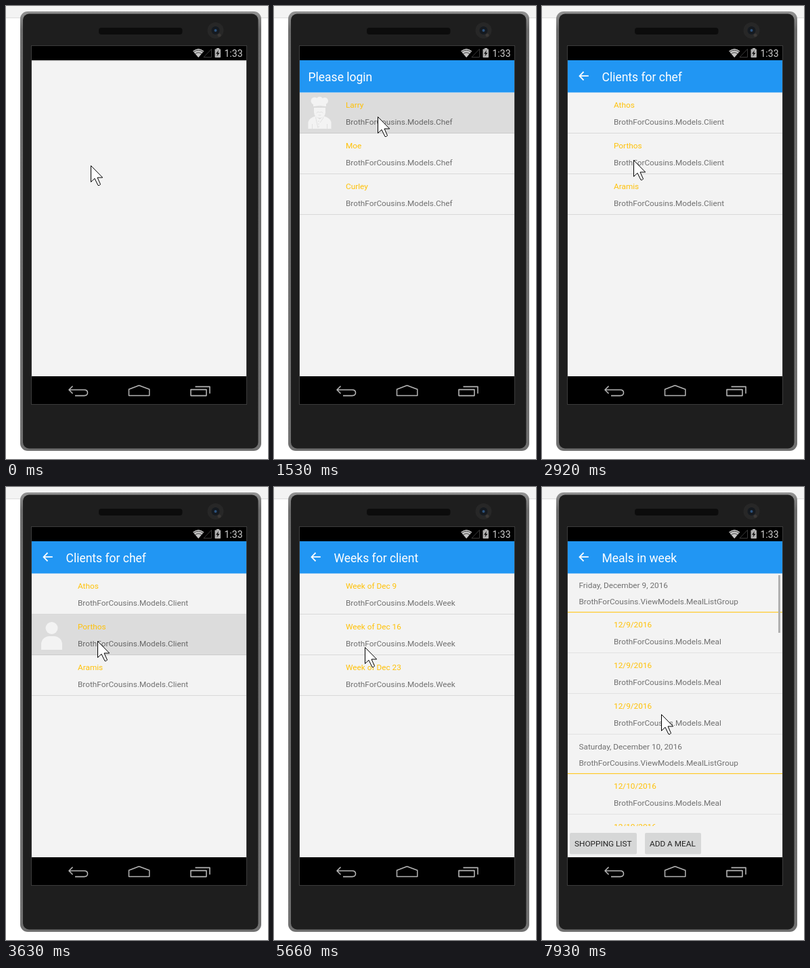
Recreate the animation shown at these times as an HTML page with a canvas. Size 387 px wide and 668 px high, loop 8 s.

```html
<!DOCTYPE html>
<html lang="en">
<head>
<meta charset="utf-8">
<title>Phone list navigation</title>
<style>
html, body { margin: 0; width: 100%; height: 100%; overflow: hidden; background: #fff; }
canvas { display: block; width: 387px; height: 668px; }
</style>
</head>
<body>
<canvas id="stage"></canvas>
<script>
const W = 387, H = 668, LOOP = 8000;
const LEFT = 38, RIGHT = 355, WIDTH = RIGHT - LEFT;
const PAPER = '#f3f3f3', AMBER = '#ffc107', GREY = 'rgba(0,0,0,.54)';
const APP = 'BrothForCousins';

const canvas = document.getElementById('stage');
const ratio = window.devicePixelRatio || 1;
canvas.width = W * ratio;
canvas.height = H * ratio;
const c = canvas.getContext('2d');
c.scale(ratio, ratio);

// Step tables: [start time, values...]
const cursorSteps = [
  [0, 125, 235], [300, 132, 245], [735, 133, 245], [1010, 144, 203], [1130, 153, 163],
  [2800, 146, 190], [2920, 135, 227], [5660, 134, 236], [5810, 137, 272],
  [5970, 179, 280], [7780, 180, 281], [7930, 176, 335]
];
const startSteps = [[0, 0], [610, .4], [735, .8], [860, 1]];
const pageSteps = [
  [0, 0], [2350, .35], [2500, .7], [2650, 1],
  [4460, 1.5], [4610, 2], [7355, 2.5], [7480, 3]
];
const titleSteps = [[0, 'Please login'], [2230, 'Clients for chef'], [4310, 'Weeks for client'], [7230, 'Meals in week']];
const pressSteps = [
  [0, -1], [1530, 0, 220], [2230, -1], [3360, 1, 220], [4310, -1],
  [6430, 2, 220], [6553, 2, 207], [6677, 2, 194], [6800, 2, 180], [7230, -1]
];

function at(steps, t) {
  let found = steps[0];
  for (const s of steps) if (s[0] <= t) found = s;
  return found.slice(1);
}

function rect(x, y, w, h, color) {
  c.fillStyle = color;
  c.fillRect(x, y, w, h);
}

function round(x, y, w, h, r, color) {
  c.fillStyle = color;
  c.beginPath();
  c.roundRect(x, y, w, h, r);
  c.fill();
}

function disc(x, y, r, color) {
  c.fillStyle = color;
  c.beginPath();
  c.arc(x, y, r, 0, Math.PI * 2);
  c.fill();
}

function text(s, x, y, color, size = 11.8) {
  c.font = size + 'px Roboto, sans-serif';
  c.fillStyle = color;
  c.fillText(s, x, y);
}

function stroke(d, color, width) {
  c.strokeStyle = color;
  c.lineWidth = width;
  c.stroke(new Path2D(d));
}

function fill(d, color) {
  c.fillStyle = color;
  c.fill(new Path2D(d));
}

function phone() {
  rect(0, 0, W, H, '#fff');
  rect(0, 0, W, 17, '#f3f3f3');
  rect(0, 17, W, 1, '#dedede');
  const edge = c.createLinearGradient(0, 8, 0, 656);
  edge.addColorStop(0, '#929292');
  edge.addColorStop(.04, '#6c6c6c');
  edge.addColorStop(1, '#707070');
  round(21, 8, 356, 648, 11, edge);
  round(25, 11.5, 347.5, 641, 9, '#1e1e1e');
  round(137, 32, 123.5, 10, 4, '#0c0c0c');
  disc(309.5, 36, 12, '#272727');
  disc(309.5, 36, 6, '#151a20');
  disc(309.5, 36, 2, '#2d527c');
  disc(315, 43, 2.5, '#3a3735');
  rect(37, 58, 319, 530, '#3b3b3b');
  rect(LEFT, 59, WIDTH, 528, '#000');
  rect(LEFT, 80, WIDTH, 466, PAPER);
}

function statusBar() {
  fill('M276 66.5Q284.2 59.5 292.4 66.5L284.2 76Z', '#c4c4c4');
  stroke('M277 68Q284.2 62.3 291.4 68M279.3 70.6Q284.2 66.8 289 70.6', '#222', .8);
  stroke('M303.5 63.5V75.5H292Z', '#3a3a3a', 1);
  rect(311, 62, 4, 2, '#b0b0b0');
  round(308.5, 63.5, 8.5, 12.5, .8, '#b0b0b0');
  fill('M314 65L310 70.5H312.5L311.3 74.5L315.5 69H313Z', '#111');
  text('1:33', 322.5, 75, '#d0d0d0', 14);
}

function navBar() {
  const tone = '#b4b4b4';
  c.lineJoin = 'round';
  stroke('M98.5 560.5L93 566L98.5 571.5M93 566H115.5Q120.5 566 120.5 570.3T115.5 574.6H102', tone, 1.6);
  stroke('M181.5 565.2L196.5 559.5L211.8 565.2V574.6H181.5Z', tone, 1.5);
  stroke('M273 565.6H296V574.6H273ZM279.5 561.4H301V571.5', tone, 1.6);
  c.lineJoin = 'miter';
}

function toolbar(title) {
  rect(LEFT, 80, WIDTH, 47.5, '#2196f3');
  const root = title === 'Please login';
  if (!root) stroke('M61.5 97L55.5 103.2L61.5 109.4M55.5 103.2H68.8', '#fff', 1.8);
  text(title, root ? 50.5 : 88.5, 110.5, '#fff', 17.5);
}

function chefIcon(y, back) {
  const ink = PAPER;
  for (const [x, dy, r] of [[60, 12, 5.5], [67.5, 10.5, 4.8], [75, 12, 5]]) disc(x, y + dy, r, ink);
  c.save();
  c.translate(0, y);
  fill('M58 13H77V20H58Z', ink);
  fill('M59 22H76V29Q75 37 67.5 37T59 29Z', ink);
  fill('M50.5 53V43Q52 37 61 34.5L67.5 39L74 34.5Q83 37 84.5 43V53Z', ink);
  stroke('M59 20.5Q67.5 18 76 20.5M62.5 30Q65 26.5 67.5 29Q70 26.5 72.5 30M65.5 33H69.5M61.5 36L65 52M73.5 36L68 44M56.5 46V53M78.5 46V53', back, .8);
  for (const dy of [42, 46, 50]) disc(66, dy, .7, back);
  c.restore();
}

function clientIcon(y) {
  disc(67.5, y + 20, 9, PAPER);
  round(52, y + 32, 31, 20, [12, 12, 0, 0], PAPER);
}

function calendarIcon(y, back) {
  const ink = '#efefef';
  rect(48, y + 11, 40, 42, ink);
  rect(51.5, y + 23, 33, 26.5, back);
  for (const x of [55, 78]) {
    rect(x - 1, y + 11, 6, 4.5, back);
    rect(x + .5, y + 6, 3, 8, ink);
  }
  [[1, 3], [0, 3], [0, 2]].forEach(([from, to], row) => {
    for (let i = from; i <= to; i++) rect(54.5 + i * 7.4, y + 26 + row * 7.3, 5, 4.6, ink);
  });
}

function row(y, name, kind, line) {
  text(name, 106, y + 22, AMBER);
  text(`${APP}.Models.${kind}`, 106, y + 47, GREY);
  rect(LEFT, y + 59, WIDTH, 1, line);
}

function simpleList(kind, names, icon) {
  return ([pressed, shade]) => {
    names.forEach((name, i) => {
      const y = 128 + i * 60;
      if (i === pressed) {
        const back = `rgb(${shade},${shade},${shade})`;
        rect(LEFT, y, WIDTH, 60, back);
        icon(y, back);
      }
      row(y, name, kind, i === pressed ? 'rgba(0,0,0,.08)' : '#d9d9d9');
    });
  };
}

function button(x, w, label) {
  round(x, 510, w, 31.5, 2, '#d6d7d7');
  text(label, x + 7, 530, '#222');
}

function meals() {
  c.save();
  c.beginPath();
  c.rect(LEFT, 127, WIDTH, 373);
  c.clip();
  [['Friday', 9], ['Saturday', 10]].forEach(([day, date], g) => {
    const y = 127 + g * 238;
    text(`${day}, December ${date}, 2016`, 54.5, y + 22, GREY);
    text(`${APP}.ViewModels.MealListGroup`, 54.5, y + 46, GREY);
    rect(LEFT, y + 57, WIDTH, 1.2, '#ffc928');
    for (let i = 0; i < 3; i++) row(y + 58 + i * 60, `12/${date}/2016`, 'Meal', '#e2e2e2');
  });
  c.restore();
  rect(349, 130, 3, 85, '#b0b0b0');
  button(41, 99, 'SHOPPING LIST');
  button(152, 83, 'ADD A MEAL');
}

const pages = [
  simpleList('Chef', ['Larry', 'Moe', 'Curley'], chefIcon),
  simpleList('Client', ['Athos', 'Porthos', 'Aramis'], clientIcon),
  simpleList('Week', ['Week of Dec 9', 'Week of Dec 16', 'Week of Dec 23'], calendarIcon),
  meals
];

function cursor(x, y) {
  c.save();
  c.translate(x + .5, y + .5);
  const arrow = 'M0 0V24L5.5 18.8L10.5 29H12.5L14 27.5L9.5 17.5H17.2Z';
  fill(arrow, '#fff');
  stroke(arrow, '#000', 1);
  c.restore();
}

function draw(t) {
  phone();
  statusBar();
  navBar();
  rect(LEFT, 80, WIDTH, 1, '#cfcfcf');
  rect(LEFT, 81, WIDTH, 1, '#e6e6e6');

  const [shown] = at(startSteps, t);
  const [page] = at(pageSteps, t);
  const press = at(pressSteps, t);
  const base = Math.floor(page), mix = page - base;
  if (shown) {
    c.globalAlpha = shown;
    toolbar(at(titleSteps, t)[0]);
    c.globalAlpha = shown * (1 - mix);
    pages[base](press);
    if (mix) {
      c.globalAlpha = mix;
      pages[base + 1](press);
    }
    c.globalAlpha = 1;
  }
  cursor(...at(cursorSteps, t));
}

const start = performance.now();
function tick() {
  draw((performance.now() - start) % LOOP);
  requestAnimationFrame(tick);
}
tick();
</script>
</body>
</html>
```
